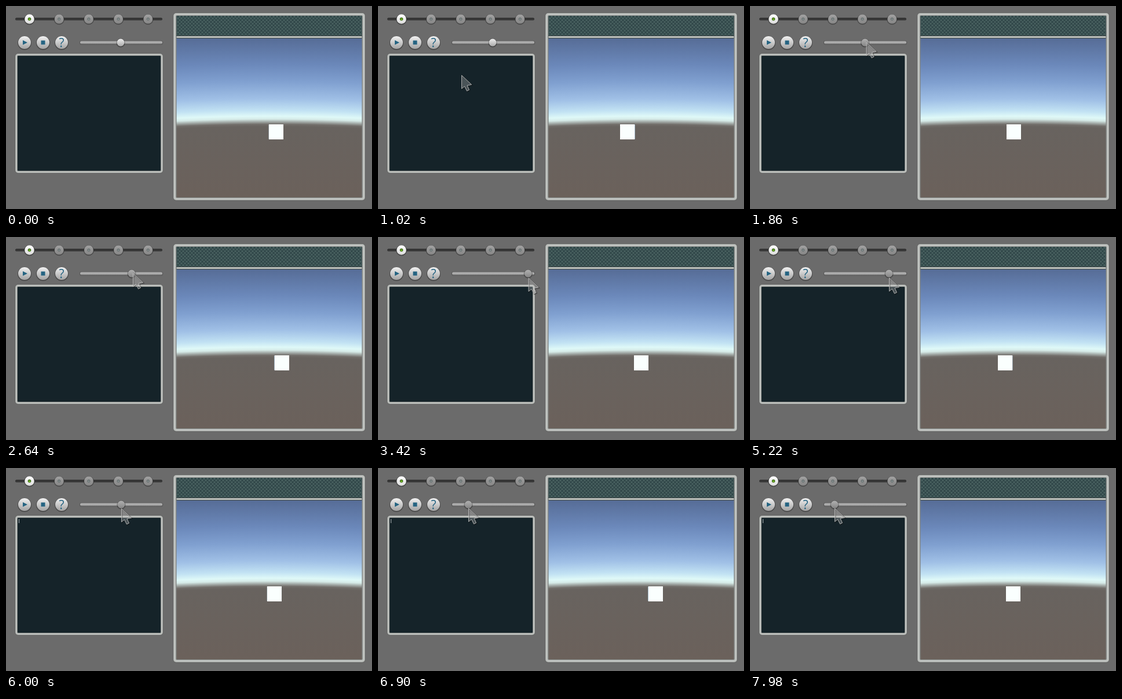
Recreate the animation shown at these times as an HTML page with a canvas. Size 632x350 px, loop 8000 ms.

```html
<!DOCTYPE html>
<html lang="en">
<head>
<meta charset="utf-8">
<title>Cube speed slider</title>
<style>
html, body { margin: 0; width: 100%; height: 100%; overflow: hidden; background: #6b6b6b; }
canvas { display: block; }
</style>
</head>
<body>
<canvas id="stage" width="632" height="350"></canvas>
<script>
const W = 632, H = 350, LOOP = 8000, STEP = 60;
const ctx = document.getElementById('stage').getContext('2d');

// Keys are [time, value, value...]
const knobKeys = [[0, 198], [1835, 198], [2640, 217], [3582, 268], [4225, 268],
  [5220, 240], [6816, 156], [7400, 156], [7700, 146]];
const cursorKeys = [[660, 502, 160], [900, 144, 119], [1140, 144, 119], [1680, 199, 64],
  [1835, 200, 62], [2640, 219, 62], [3582, 268, 72], [4225, 268, 72],
  [5220, 240, 70], [6816, 156, 69], [7400, 156, 69], [7700, 146, 69]];

function track(keys, t) {
  const next = keys.findIndex(key => key[0] > t);
  if (next === 0) return keys[0].slice(1);
  if (next < 0) return keys[keys.length - 1].slice(1);
  const a = keys[next - 1], b = keys[next];
  const p = (t - a[0]) / (b[0] - a[0]);
  return a.slice(1).map((v, i) => v + (b[i + 1] - v) * p);
}

// The slider sets the cube's swing speed, so its phase is the sum over the knob's path.
const phases = [152];
for (let frame = 0; frame * STEP < LOOP; frame++) {
  let phase = phases[frame];
  for (let i = 0; i < 6; i++) {
    const knob = track(knobKeys, frame * STEP + i * 10 + 5)[0];
    phase += (30 + 0.78 * (knob - 146)) / 6;
  }
  phases.push(phase);
}

function gradient(c, y0, y1, stops) {
  const g = c.createLinearGradient(0, y0, 0, y1);
  stops.forEach(([at, color]) => g.addColorStop(at, color));
  return g;
}

function box(c, x, y, w, h, r, fill) {
  c.beginPath();
  c.roundRect(x, y, w, h, r);
  c.fillStyle = fill;
  c.fill();
}

function disc(c, x, y, r, fill) {
  c.beginPath();
  c.arc(x, y, r, 0, 7);
  c.fillStyle = fill;
  c.fill();
}

function ball(c, x, y, r, top, bottom) {
  disc(c, x, y + 0.7, r + 1, 'rgba(40,40,40,.5)');
  disc(c, x, y, r, gradient(c, y - r, y + r, [[0, top], [1, bottom]]));
}

function frameBox(c, x, y, w, h, border) {
  const layer = (inset, r, fill) =>
    box(c, x + inset, y + inset, w - 2 * inset, h - 2 * inset, r, fill);
  layer(-1, 6, '#646464');
  layer(0, 5, '#a6a9a6');
  layer(1, 4, '#bfc2bf');
  layer(border - 1, 2, '#848886');
}

function drawHatch(c) {
  c.fillStyle = '#263b3e';
  c.fillRect(294, 17, 321, 35);
  c.fillStyle = '#48605f';
  for (let row = 0; row < 12; row++) {
    for (let x = 294 + (row % 2) * 3; x < 617; x += 6) {
      const y = 18.5 + row * 3;
      c.beginPath();
      c.moveTo(x - 2.6, y);
      c.lineTo(x, y - 2.2);
      c.lineTo(x + 2.6, y);
      c.lineTo(x, y + 2.2);
      c.fill();
    }
  }
}

function drawView(c) {
  frameBox(c, 289, 12, 331, 323, 5);
  c.save();
  c.beginPath();
  c.rect(294.5, 17, 320, 313);
  c.clip();

  // The horizon dips slightly towards both sides.
  for (let x = 294; x < 615; x++) {
    const dip = 3.5 * ((x - 454) / 160) ** 2;
    const at = y => (y + dip - 55) / 275;
    c.fillStyle = gradient(c, 55, 330, [
      [0, '#566c96'], [at(100), '#6b88ba'], [at(130), '#80a0d0'], [at(160), '#a0c0e6'],
      [at(180), '#c2e2f3'], [at(190), '#dff9f8'], [at(195), '#d6ebe8'],
      [at(199), '#a9b2af'], [at(204), '#716d69'], [at(208), '#68635f'], [1, '#6b615b']]);
    c.fillRect(x, 55, 1, 275);
  }

  drawHatch(c);
  c.fillStyle = '#3d4645';
  c.fillRect(294, 51, 321, 5);
  c.fillStyle = '#bcc0bd';
  c.fillRect(294, 52, 321, 3);
  c.restore();
}

function drawScene(c) {
  c.fillStyle = '#6b6b6b';
  c.fillRect(0, 0, W, H);

  box(c, 16, 20, 254, 5, 2.5, gradient(c, 20, 25, [[0, '#454545'], [0.4, '#2d2d2d'], [1, '#484848']]));
  for (let i = 0; i < 5; i++) {
    const x = 40.5 + i * 51.2;
    if (i === 0) {
      ball(c, x, 22.5, 8.3, '#ffffff', '#dcdcdc');
      disc(c, x, 22.5, 2.8, '#3f6b1c');
      disc(c, x, 22.8, 1.6, '#76b82a');
    } else {
      ball(c, x, 22.5, 8, '#a2a2a2', '#868686');
      disc(c, x, 22.5, 2.7, '#6c7474');
      disc(c, x, 22.8, 1.5, '#838c8c');
    }
  }

  for (const x of [32, 64, 96]) ball(c, x, 63, 11, '#f2f2f2', '#a3a3a3');
  c.fillStyle = '#256482';
  c.beginPath();
  c.moveTo(29, 59);
  c.lineTo(37, 63);
  c.lineTo(29, 67);
  c.fill();
  c.fillRect(60.5, 59.5, 7, 7);
  c.font = '500 21px "Open Sans", sans-serif';
  c.textAlign = 'center';
  c.fillText('?', 96, 70.5);

  box(c, 127, 59.5, 144, 7.5, 3.5, '#585858');
  box(c, 128, 60, 142, 6, 3,
    gradient(c, 60, 66, [[0, '#7e7e7e'], [0.4, '#b8b8b8'], [0.65, '#a0a0a0'], [1, '#6c6c6c']]));

  frameBox(c, 16, 82, 255, 206, 4);
  box(c, 20, 86, 247, 198, 1, '#152329');

  drawView(c);
}

function drawCube(phase) {
  const swing = Math.sin(phase * Math.PI / 180);
  const x = Math.round(442.3 + 24.5 * swing);
  const side = Math.abs(swing);
  ctx.fillStyle = '#a9bccb';
  ctx.fillRect(swing > 0 ? x - side : x + 25, 204.5, side, 25);
  ctx.fillStyle = '#fafffe';
  ctx.fillRect(x, 204, 25, 26);
}

const arrow = new Path2D('M0 0 V23 L5 19 L9 27 L13 25 L9.5 17.5 L17 16 Z');

function drawCursor(x, y) {
  ctx.save();
  ctx.translate(x + 1.5, y + 1.5);
  ctx.strokeStyle = 'rgba(20,20,20,.4)';
  ctx.lineWidth = 2;
  ctx.stroke(arrow);
  ctx.translate(-1, -1);
  ctx.fillStyle = 'rgba(200,200,200,.3)';
  ctx.fill(arrow);
  ctx.strokeStyle = 'rgba(205,205,205,.8)';
  ctx.lineWidth = 1;
  ctx.stroke(arrow);
  ctx.restore();
}

const scene = document.createElement('canvas');
scene.width = W;
scene.height = H;
drawScene(scene.getContext('2d'));

function draw(now) {
  const frame = Math.floor((now % LOOP) / STEP);
  const t = frame * STEP;
  ctx.drawImage(scene, 0, 0);
  drawCube(phases[frame]);

  const knob = track(knobKeys, t)[0];
  const pressed = t >= 1740;
  ball(ctx, knob, 63, 6.5, pressed ? '#b0b0b0' : '#eeeeee', pressed ? '#868686' : '#aaaaaa');

  const caretOn = Math.floor((7547 - t) / 466) & 1;
  if (caretOn) {
    ctx.fillStyle = '#a9b0b2';
    ctx.fillRect(22, 88, 1, 7);
  }
  if (t >= cursorKeys[0][0]) drawCursor(...track(cursorKeys, t));
}

function tick() {
  draw(performance.now());
  requestAnimationFrame(tick);
}
tick();
</script>
</body>
</html>
```
